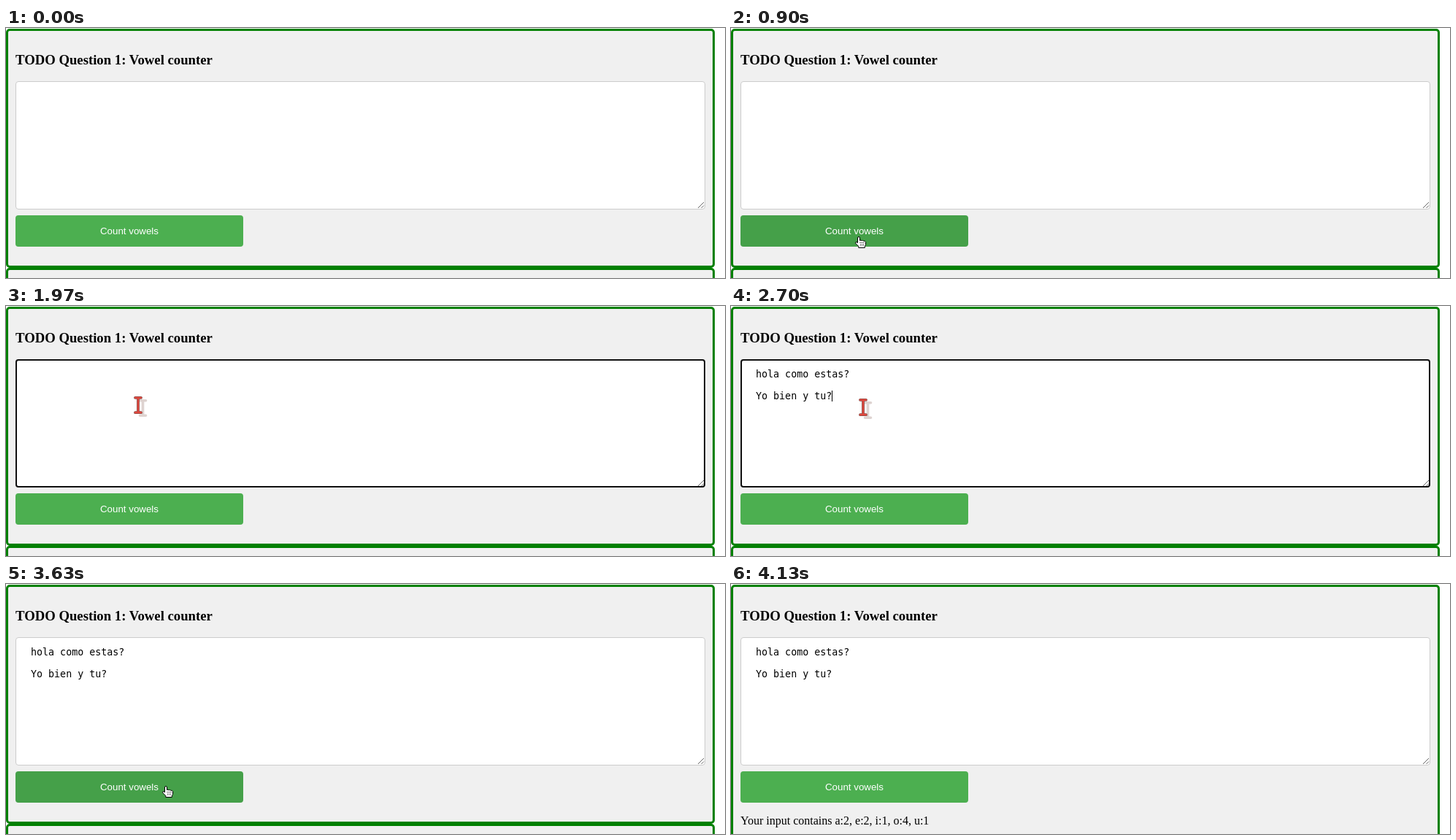
An HTML page that plays this animation: 985 px wide and 343 px high, repeating every 7.11 s.

```html
<!DOCTYPE html>
<html lang="en">
<head>
<meta charset="utf-8">
<title>Vowel counter</title>
<style>
  html, body { margin: 0; width: 100%; height: 100%; overflow: hidden; background: #fff; }
  body * { position: absolute; box-sizing: border-box; margin: 0; white-space: pre; }
  #stage { left: 0; top: 0; width: 985px; height: 343px; overflow: hidden; }
  .panel {
    left: 0; top: 1px; width: 971px; height: 328px;
    background: #f0f0f0; border: 3px solid green; border-radius: 5px;
  }
  .next { top: 329px; }
  .done .panel { height: 400px; }
  .done .next, #result { display: none; }
  .done #result { display: block; }
  h3, #result { left: 13px; color: #000; font-family: "Liberation Serif", serif; }
  h3 { top: 33px; font-size: 18.72px; line-height: 21px; }
  #result { top: 316px; font-size: 16px; line-height: 18px; }
  #field {
    left: 13px; top: 73px; width: 945px; height: 176px;
    background: #fff; border: 1px solid #ccc; border-radius: 4px;
  }
  .focus #field { outline: 2px solid #101010; outline-offset: -2px; }
  #typed {
    left: 20px; top: 12px; color: #000;
    font: 13.3333px/15px "DejaVu Sans Mono", monospace;
  }
  #caret { width: 1px; height: 15px; background: #000; }
  #grip { right: 0; bottom: 0; width: 10px; height: 10px; }
  #button {
    left: 13px; top: 257px; width: 312px; height: 43px;
    background: #4caf50; border-radius: 4px; color: #fff; text-align: center;
    font: 13.3333px/15px "Liberation Sans", sans-serif; padding: 14px 0;
  }
  .hover #button { background: #45a049; }
  .cursor { left: 0; top: 0; width: 30px; height: 36px; overflow: visible; visibility: hidden; }
  .shadow { opacity: .22; filter: blur(.6px); }
</style>
</head>
<body>
<div id="stage">
  <div class="panel"></div>
  <div class="panel next"></div>
  <h3>TODO Question 1: Vowel counter</h3>
  <div id="field">
    <svg id="grip"><path d="M1 9 9 1M5.5 9 9 5.5" stroke="#666" fill="none"/></svg>
    <div id="typed"></div>
    <div id="caret"></div>
  </div>
  <div id="button">Count vowels</div>
  <p id="result"></p>

  <svg class="cursor" id="arrow">
    <defs><path id="arrowShape" d="M.7.8V17.8L4.6 14.6 8.2 23.4 12 21.8 8.6 13.4 13 13Z" stroke-linejoin="round"/></defs>
    <use class="shadow" href="#arrowShape" x="7" y="3"/>
    <use href="#arrowShape" fill="#f8423a" stroke="#3c2424"/>
  </svg>
  <svg class="cursor" id="beam" fill="none" stroke-linecap="round">
    <defs><path id="beamShape" d="M2 1.8H10M2 22.2H10M6 2V22"/></defs>
    <use class="shadow" href="#beamShape" x="6.5" y="4" stroke="#6b3a30" stroke-width="3.6"/>
    <use href="#beamShape" stroke="#8b4a45" stroke-width="3.8"/>
    <use href="#beamShape" stroke="#e0483e" stroke-width="2.2"/>
  </svg>
  <svg class="cursor" id="hand" stroke="#000">
    <path fill="#fff" stroke-linejoin="round" d="M3.5 2Q3.5.5 5 .5T6.5 2V5.5Q8 4.6 9.3 5.8 10.6 5 11.8 6.3 13.8 5.8 14.5 7.6V11.5L13.3 13.5V15.5H4.8V13.5L.8 9.5Q.2 7.6 2 7.5L3.5 8.8Z"/>
    <path fill="none" stroke-dasharray="1 1" d="M6.5 8.5H13M7.5 10.5V13M9.5 10.5V13M11.5 10.5V13"/>
  </svg>
</div>
<script>
const LOOP = 7110;
const $ = id => document.getElementById(id);
const text = "hola como estas?\n\nYo bien y tu?";

// [start ms, pointer, left, top]
const moves = [
  [0, ""],
  [400, "arrow", 943, 326], [470, "arrow", 600, 318], [530, "arrow", 290, 310],
  [600, "arrow", 154, 302], [700, "hand", 162, 290], [900, "hand", 170, 286],
  [1170, "hand", 172, 268], [1230, "beam", 174, 200], [1300, "beam", 175, 125],
  [1370, "beam", 175, 124],
  [2700, "beam", 175, 127], [2770, "beam", 180, 195], [2840, "hand", 194, 265],
  [2900, "arrow", 207, 301], [3000, "hand", 212, 284], [3100, "hand", 214, 277],
  [4100, "hand", 212, 290], [4130, ""]
];

function countVowels(s) {
  const counts = [...("aeiou")].map(v => v + ":" + (s.split(v).length - 1));
  return "Your input contains " + counts.join(", ");
}
// The page counts only two of the three a's.
$("result").textContent = countVowels(text).replace("a:3", "a:2");

const within = (t, from, to) => t >= from && t < to;

function render(t) {
  const [, pointer, x, y] = moves.findLast(m => m[0] <= t);
  for (const id of ["arrow", "beam", "hand"]) {
    const style = $(id).style;
    style.visibility = id === pointer ? "visible" : "hidden";
    if (id === pointer) style.transform = `translate(${x}px, ${y}px)`;
  }

  const typed = t >= 2270;
  const caretOn = within(t, 1400, 1970) || within(t, 2270, 2900) || within(t, 3470, 3630);
  $("typed").textContent = typed ? text : "";
  $("caret").style.cssText =
    `left:${typed ? 124 : 20}px; top:${typed ? 42 : 12}px; opacity:${+caretOn}`;

  const state = $("stage").classList;
  state.toggle("focus", within(t, 1400, 3630));
  state.toggle("hover", pointer === "hand");
  state.toggle("done", t >= 3770);
}

const start = performance.now();
function tick() {
  render((performance.now() - start) % LOOP);
  requestAnimationFrame(tick);
}
tick();
</script>
</body>
</html>
```
